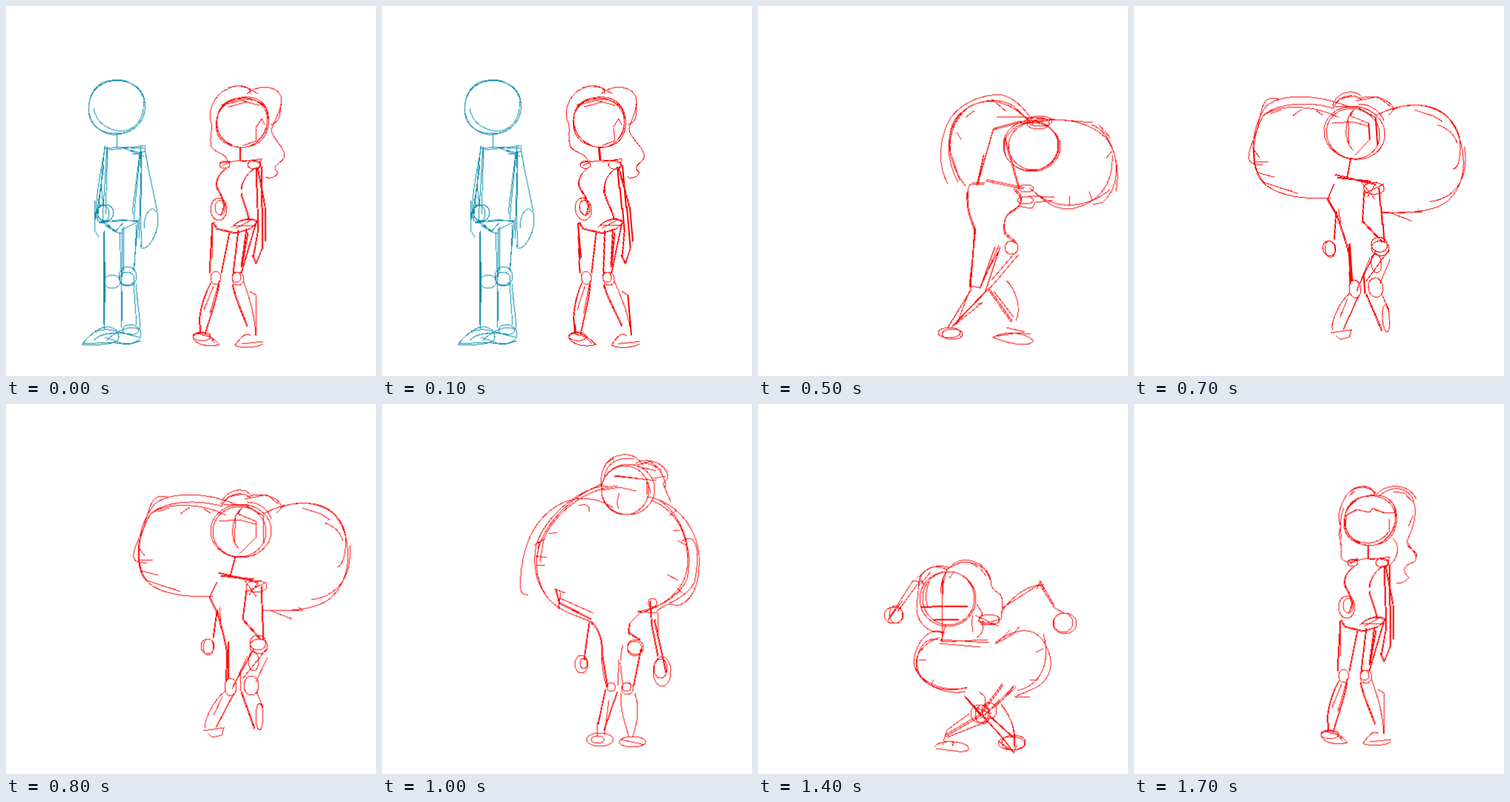
Animation, 500 px wide and 500 px high, one loop 1.8 s. Source, as an HTML page without scripts:

```html
<!DOCTYPE html>
<html lang="en">
<head>
<meta charset="utf-8">
<title>Rough sketch loop</title>
<style>
  html, body { margin: 0; width: 100%; height: 100%; overflow: hidden; background: #fff; }
  svg { display: block; width: 100%; height: 100%; overflow: hidden; }
  svg * { fill: none; vector-effect: non-scaling-stroke; }
  .strip { stroke: #f00; stroke-width: 1; shape-rendering: crispEdges; animation: flip 1.8s steps(18) -4ms infinite; }
  .him { stroke: #0088a8; }
  /* poses lean and stretch from the feet */
  .strip use { transform-origin: 320px 450px; }
  @keyframes flip { to { transform: translateX(-9000px); } }
</style>
</head>
<body>
<svg viewBox="-.5 -.5 500 500">
<defs>
  <g id="man">
    <path d="M149 100C120 98 109 122 112 145C116 165 135 175 150 173C175 171 190 152 187 130C184 110 165 99 149 99M128 106C112 115 106 140 116 157C128 175 160 176 175 163C192 148 191 118 175 108C160 97 135 99 126 108M118 138C122 160 140 168 158 169C178 165 187 148 185 128M140 101C160 96 178 106 186 124"/>
    <path d="M149 172V190M150 174L149 191M136 192L150 190L186 192M138 194L165 191L188 188M160 192L186 203M166 194L182 198M170 200L188 196"/>
    <path d="M136 190L130 290M137 190L134 282M134 188C128 220 120 260 121 288M133 190L126 260L123 290M132 215L122 280M119 262V302L125 312M128 240L131 270"/>
    <path d="M181 196L172 288M180 200L170 280M181 189C184 230 180 300 183 324M183 196L179 315M187 190C192 230 205 270 205 290C204 310 192 328 183 327L181 322M186 300C186 276 198 268 202 278"/>
    <ellipse cx="134" cy="279" rx="11" ry="11"/><ellipse cx="130" cy="280" rx="9" ry="12"/>
    <path d="M128 291L178 289M125 293L155 288L178 291M129 290L147 305L158 292M133 296C145 302 150 308 156 306M178 291L156 302M135 293L150 306"/>
    <path d="M132 300L133 436M131 305V430M133 345V400M157 300L155 435M153 305L156 380M158 298V358M178 291L172 358M176 295L173 350M175 375C177 400 181 425 181 436M156 385V425M172 375L176 430"/>
    <ellipse cx="143" cy="372" rx="11" ry="9"/><ellipse cx="164" cy="365" rx="12" ry="13"/><ellipse cx="163" cy="368" rx="10" ry="9"/><ellipse cx="168" cy="437" rx="11" ry="7"/>
    <path d="M102 457C112 445 125 432 138 433C150 435 155 445 150 452C140 458 115 458 102 457M104 456L140 454L165 457L182 452M118 452C125 442 145 440 168 443M135 452C150 436 170 430 181 437C185 450 175 458 155 455L133 447M120 441C135 430 160 444 180 447"/>
  </g>

  <g id="girl">
    <path d="M317 124C295 124 283 140 284 160C286 180 303 191 320 191C340 188 354 172 353 150C350 132 335 122 315 124M300 130C280 142 279 170 292 182C310 195 338 193 349 175C360 155 355 130 335 124C318 120 300 125 290 138M286 145C282 165 286 180 305 187M350 135C358 155 350 175 335 186"/>
    <path d="M315 190V208M316 191V208M292 215C305 207 330 206 343 212M288 212L303 209M318 210L345 206L341 219"/>
    <ellipse cx="295" cy="214" rx="7" ry="5"/><ellipse cx="335" cy="214" rx="9" ry="6"/><ellipse cx="287" cy="274" rx="11" ry="15"/><ellipse cx="289" cy="272" rx="7" ry="10"/>
    <path id="girl-limbs" d="M297 219C285 228 281 240 288 250C293 258 298 270 290 282M337 218C325 225 317 238 318 252C320 265 327 275 328 288M340 217L350 270L351 317M338 217L341 300L334 340M345 215L347 325L338 347L333 335M280 291L285 300L310 306L330 300L340 291C330 283 315 288 305 298M279 292L275 360M302 305L291 360M314 302L307 360M338 292L318 360M327 305L319 350M325 300L318 352M277 373C265 395 260 420 262 430L262 442M288 375C284 400 272 430 269 443M306 375C310 395 320 415 326 432"/>
    <use href="#girl-limbs" x="-1" y="1"/>
    <path d="M310 300L332 288M307 296L338 296M320 370C328 395 335 410 337 445M329 385L337 390V445M278 300V340M280 378L267 410M288 370L275 415"/>
    <ellipse cx="283" cy="367" rx="7" ry="9"/><ellipse cx="313" cy="368" rx="8" ry="9"/><ellipse cx="311" cy="366" rx="6" ry="7"/><ellipse cx="264" cy="446" rx="12" ry="6"/>
    <path d="M252 446C262 436 275 443 288 457C275 461 255 458 252 447M256 441L275 447L282 455M309 458C318 445 325 440 330 445M318 456L347 453M309 458C318 463 340 461 347 456"/>
  </g>
  <g id="curls">
    <path d="M297 113C310 104 330 106 330 118M300 110L312 107L326 110L340 118M325 118C340 106 365 106 371 122C374 140 360 155 358 168C362 182 376 190 376 203C372 212 358 216 365 222C372 228 352 236 351 230M297 112C282 120 272 140 276 155C281 165 273 175 277 190C284 200 297 197 299 210M372 130C368 142 374 155 357 160M290 134C310 122 340 122 350 137M293 133L318 127L342 134M300 136L325 129M337 164L345 152L349 160M338 165L337 182L320 188"/>
  </g>
  <g id="bunches">
    <path d="M325 122C320 106 298 108 287 122C276 140 274 155 279 165C272 178 284 190 279 205C284 218 300 214 301 207M292 119C300 110 315 110 327 120M283 140C274 160 282 175 278 190M327 122C340 106 370 106 381 128M330 124C345 112 362 108 375 125C384 145 378 165 368 185C376 200 386 205 378 213C364 218 360 224 371 234Q365 242 354 242M349 181C360 190 356 208 346 216M368 190L382 202L380 210M350 118L365 120L376 132M290 124L298 117M377 150L370 165M287 150L300 142L318 146L322 140L335 146L352 147M289 148L302 142M324 142L340 147M287 150C284 165 285 178 300 184C318 192 335 185 344 172V155"/>
  </g>

  <g id="folded">
    <g id="hip"><ellipse cx="196" cy="141" rx="18" ry="12" transform="rotate(20 196 141)"/></g>
    <use href="#hip" x="-1" y="-3"/><use href="#hip" x="2" y="3"/>
    <path d="M190 152L187 215L191 222L200 150M193 153L194 220M200 152L188 220M198 135L197 210M203 156C196 185 192 215 202 240C207 235 217 200 216 170L210 150M197 210L205 203L206 193M194 205L201 238"/>
    <path d="M180 128C200 150 240 145 270 152L300 165M227 149L226 160L258 150M230 152L300 170M210 168L260 160L330 165M240 157L310 180"/>
    <ellipse cx="258" cy="175" rx="25" ry="10"/><ellipse cx="262" cy="171" rx="20" ry="11"/><ellipse cx="256" cy="178" rx="21" ry="11"/>
    <path d="M242 182L235 250L236 261L233 258M246 184L240 248L245 255L262 185M270 172L248 250M265 178L243 243M258 165L246 252M241 170L237 245"/>
    <ellipse cx="314" cy="180" rx="18" ry="15"/><ellipse cx="312" cy="182" rx="14" ry="14"/>
    <path d="M275 141C300 138 330 150 334 185C334 205 305 203 297 195M260 150C290 140 325 155 330 180M285 143L315 165L330 162M325 165L324 205"/>
  </g>
  <g id="eating">
    <path d="M274 131C250 140 220 155 214 165M214 165L280 170M240 160L275 152L300 158M290 137C310 130 340 135 355 155M297 139C315 130 345 138 355 160L336 163M300 135L325 140L340 152M345 163C370 168 378 195 370 222C362 245 338 250 326 240M360 163C380 195 375 235 345 246L326 247M250 195C260 205 290 213 310 211C340 205 350 180 342 155M312 210C345 205 350 170 335 150M320 137L352 147M362 172L374 190V210M278 170L303 228M282 175L290 205L305 229M300 205L288 228"/>
    <ellipse cx="297" cy="158" rx="15" ry="10"/><ellipse cx="293" cy="160" rx="14" ry="8"/>
    <ellipse cx="309" cy="236" rx="15" ry="9"/><ellipse cx="306" cy="232" rx="14" ry="8"/>
    <path id="eat-limbs" d="M271 224L320 228M275 231L325 237M272 232L256 260L308 268M282 235L266 262M318 245L308 268M280 262L306 266M277 268L280 297M308 268C303 285 315 295 328 308M283 300L279 380M310 325L300 385M307 318L293 380M330 322L313 365M338 318L316 375M298 386L262 440M315 372L330 425M319 372C328 390 335 410 336 432"/>
    <use href="#eat-limbs" x="1" y="1"/>
    <path d="M278 268V296M290 315V382M287 290L279 350M320 240V225L290 226M281 387C270 400 262 415 260 432M285 388L258 440M275 398L280 390"/>
    <ellipse cx="328" cy="312" rx="13" ry="13"/><ellipse cx="326" cy="314" rx="10" ry="10"/><path d="M316 293C335 292 347 303 344 316"/>
    <ellipse cx="287" cy="382" rx="6" ry="6"/><ellipse cx="314" cy="363" rx="5" ry="8"/>
    <path d="M252 437C265 425 285 425 291 435C285 443 265 447 257 445ZM313 435C325 428 350 433 357 442L316 441ZM320 437L340 443"/>
  </g>

  <g id="full">
    <path d="M256 240C245 220 240 185 260 150C280 125 310 118 330 120C350 125 365 145 372 158M280 243C262 220 252 190 262 160C275 130 320 118 345 135L372 160M270 238C250 200 255 165 275 143C300 122 335 122 365 155M261 205C255 180 262 155 285 135M262 203L272 235M268 170L274 180M280 150L292 141M315 125L335 142M322 150L350 149L452 157M372 158C400 150 440 150 470 178C490 205 488 245 465 265L452 268M478 200C480 235 465 262 430 272C405 280 385 262 366 245M450 160C480 170 490 220 483 250M372 250C400 275 440 275 475 248M460 160L476 178M470 205L478 195M365 256L400 258M420 270V256M447 250L451 262"/>
    <ellipse cx="368" cy="188" rx="37" ry="34"/><ellipse cx="370" cy="190" rx="38" ry="33"/><ellipse cx="372" cy="189" rx="34" ry="32"/>
    <ellipse cx="378" cy="158" rx="15" ry="8"/><ellipse cx="380" cy="155" rx="17" ry="7"/>
    <path id="full-limbs" d="M318 165L297 238M305 200L296 240M333 175L353 245M318 165L350 156L395 152M290 238L306 238M308 234L360 245M283 250C282 275 287 285 293 300L287 380M345 245C362 258 358 268 340 278C330 285 332 305 335 307L348 318M320 325L300 380M327 325L307 385M288 382L257 432M310 382L262 432M311 380L343 425"/>
    <use href="#full-limbs" x="-1" y="2"/>
    <path d="M350 270L370 273L374 265L398 262M284 260C280 240 290 236 297 240M294 300L285 378L300 380L325 323M352 335L312 382M345 335L315 370M303 370L325 330M285 385L268 430M263 432L303 400L296 403M335 370C350 385 355 410 348 425M318 385L345 420"/>
    <ellipse cx="342" cy="326" rx="9" ry="9"/><ellipse cx="362" cy="246" rx="10" ry="5"/><ellipse cx="361" cy="262" rx="11" ry="5"/>
    <ellipse cx="258" cy="441" rx="15" ry="7"/><ellipse cx="262" cy="443" rx="14" ry="7"/>
    <path d="M317 447C335 438 360 440 372 452C365 462 335 455 317 447M320 446L350 441L368 443M335 434L360 440"/>
  </g>

  <g id="sway">
    <path d="M310 135C270 118 220 118 200 135C180 160 172 200 183 230C195 252 230 262 279 259M220 126C190 115 195 150 180 180C165 210 172 215 190 214M292 138C260 128 215 130 195 148C178 175 172 215 190 238L235 253M195 148C220 130 270 135 297 150M180 195L187 205M178 210H198M183 225L205 231M210 245L228 250M205 145L220 140M235 148L248 139M267 141L276 147M347 148C380 130 430 125 448 155C465 180 470 230 440 260C420 280 370 280 347 278M370 140C400 125 450 135 458 175C460 200 455 218 447 220M464 190C468 235 445 260 412 264M347 279L400 278L395 274M355 278L386 290M365 147L372 140M400 140L425 148L437 156M430 160C445 165 452 175 455 185"/>
    <ellipse cx="317" cy="171" rx="41" ry="36"/><ellipse cx="315" cy="172" rx="36" ry="34"/>
    <path d="M290 135C295 116 320 110 330 122M291 137C300 118 320 118 330 126M325 125C345 118 370 125 372 140M322 128L352 122L368 135M300 125L320 121M320 138C305 150 300 180 314 195M322 136L347 150V188M318 140L313 148L337 158V180L315 202M287 158L315 156L337 162M310 150L308 187M293 135L325 137L348 151M325 132C345 132 355 145 358 155"/>
    <path id="sway-limbs" d="M310 205L303 232M287 227L340 240M290 231L335 236M285 240L275 260L285 280L280 315M285 277C290 300 298 320 299 340L297 375M325 250L320 290L345 318M345 245L348 318M300 320V370M335 330L307 380M352 330L320 370M308 390L284 436M318 388L336 438"/>
    <use href="#sway-limbs" x="-1" y="1"/>
    <path d="M288 274L290 295M322 238L338 260M343 237L328 258M325 253L352 240M295 388C280 400 268 425 268 437M292 395L280 420M326 340L305 385M353 342L337 375M316 360V388M338 388L347 410"/>
    <ellipse cx="338" cy="246" rx="14" ry="8"/><ellipse cx="272" cy="327" rx="9" ry="10"/><ellipse cx="273" cy="328" rx="7" ry="11"/>
    <ellipse cx="340" cy="322" rx="11" ry="10"/><ellipse cx="341" cy="327" rx="12" ry="10"/><ellipse cx="334" cy="347" rx="7" ry="13"/><ellipse cx="303" cy="382" rx="8" ry="12"/><ellipse cx="331" cy="380" rx="10" ry="13"/><ellipse cx="342" cy="422" rx="5" ry="18"/>
    <path d="M266 441L294 437L291 447L278 450L273 445"/>
  </g>

  <g id="puff">
    <path d="M312 140C300 130 260 115 225 145C195 170 185 215 187 250Q188 258 197 257M305 110C270 110 220 150 208 190C200 230 215 270 260 285L285 295M298 107C265 120 215 155 208 210C208 240 220 265 240 275M318 110C270 115 230 150 217 185M205 190L220 182M207 205L222 207M208 218L220 217M212 185L208 215M218 183L213 213M225 175L236 173M265 137Q280 132 280 145M357 125C395 130 425 165 428 205C430 240 420 265 400 272L388 270M365 130C400 145 415 180 412 220C408 255 375 275 348 282M375 130C405 150 420 195 412 235C402 260 375 275 345 280M405 185C425 170 430 200 422 240C412 262 380 270 370 280M388 150L398 143M393 170H402M399 184L410 190M385 230L400 238M398 248L406 255"/>
    <ellipse cx="332" cy="115" rx="36" ry="34"/><ellipse cx="328" cy="116" rx="32" ry="33"/>
    <path d="M295 110C295 85 305 70 325 68C340 66 350 78 352 82M300 98C303 80 318 70 340 74M342 80C360 70 385 80 386 100L379 107L390 132M344 82C360 75 380 84 383 112M305 78L313 73M345 84L370 90M350 80L362 77L378 90M366 100L383 97M313 97L370 103M314 96L360 102M297 116L320 112L343 117M320 120C317 130 317 138 320 141M357 100V122M359 106L363 120"/>
    <path id="puff-limbs" d="M235 250L240 268L283 290M280 293C295 300 298 320 298 340L305 382M348 282L335 295L333 308L349 318M280 295L273 345M362 265L365 300L373 340M368 290L384 362M350 330L340 380M318 388L300 440M302 385L292 432"/>
    <use href="#puff-limbs" x="-1" y="1"/>
    <path d="M241 254L238 277M240 262L285 282M232 249L247 255M345 280L372 282V310M297 325C294 350 300 370 303 382M320 345L318 380M325 325C320 345 322 360 325 378M306 400L300 447M323 390C320 410 328 430 333 450M341 390C348 410 345 430 338 450M290 430V448"/>
    <ellipse cx="269" cy="351" rx="9" ry="12"/><ellipse cx="272" cy="350" rx="5" ry="7"/><ellipse cx="365" cy="268" rx="6" ry="6"/><ellipse cx="378" cy="361" rx="12" ry="20"/><ellipse cx="376" cy="357" rx="9" ry="13"/>
    <ellipse cx="342" cy="328" rx="11" ry="10"/><ellipse cx="341" cy="330" rx="10" ry="10"/><ellipse cx="309" cy="382" rx="6" ry="6"/><ellipse cx="331" cy="384" rx="8" ry="8"/><ellipse cx="330" cy="382" rx="6" ry="6"/>
    <ellipse cx="294" cy="453" rx="18" ry="9"/><ellipse cx="291" cy="453" rx="9" ry="5"/><ellipse cx="338" cy="456" rx="18" ry="7"/><path d="M322 453L355 460"/>
  </g>

  <g id="squat">
    <ellipse cx="256" cy="263" rx="38" ry="37"/><ellipse cx="257" cy="262" rx="35" ry="36"/>
    <path d="M218 245C215 225 235 215 257 220M217 240C220 222 240 214 255 224M247 255C245 230 260 212 280 210C300 212 315 225 315 245C320 258 330 250 330 270L328 290M248 250L255 222L275 213C300 213 310 225 313 237M215 235L223 228M219 243L233 226M225 245L218 236M265 225L258 235M285 213L296 220M300 222L308 232M217 240L214 275C213 290 225 305 240 308M231 240C225 255 225 265 230 275M295 270L303 283L297 293M290 285C285 300 293 305 289 308M303 292C305 305 303 310 295 315M248 240V320M250 235L248 280"/>
    <path id="mouth" d="M220 274L250 272L283 273M238 290H271"/><use href="#mouth" y="1"/>
    <path d="M253 298L247 320M217 240L209 238L176 290M195 265L175 292M215 243L188 280M300 298L328 290L330 275L380 243L400 275L415 283M330 278C345 258 365 243 386 244M380 238L400 272M376 250L381 239L386 250M293 285L325 300M298 293L320 298"/>
    <ellipse cx="183" cy="285" rx="13" ry="11"/><ellipse cx="186" cy="284" rx="9" ry="12"/><ellipse cx="414" cy="296" rx="16" ry="14"/><ellipse cx="412" cy="295" rx="13" ry="13"/><ellipse cx="312" cy="291" rx="14" ry="7"/>
    <path d="M245 318L312 322M245 323L300 328M247 321L310 318M250 308C225 300 210 330 210 350C215 375 250 390 282 383M243 318C220 312 208 345 218 365C230 385 260 392 280 388M245 315C215 325 205 350 220 370C235 385 260 390 282 382M235 306L252 309M216 335L223 330M217 345H227M233 380L237 372M320 322C350 300 375 300 388 325C402 350 395 375 370 385L347 395M320 324L345 310L353 300M325 320L340 305M385 310C395 345 385 378 350 387M375 335L385 330M367 372H378M347 395H367M345 380L330 400"/>
    <path id="squat-legs" d="M278 393L300 420M347 380L315 410M330 377L298 420L252 447M280 395L330 450L345 470M312 420L345 450M328 405C340 420 348 440 345 462"/>
    <use href="#squat-legs" x="1" y="2"/>
    <path d="M298 388L306 395V410M310 428L255 450M250 455L255 440L285 418M295 410L315 418M300 425L318 408"/>
    <ellipse cx="299" cy="418" rx="12" ry="12"/><ellipse cx="312" cy="414" rx="10" ry="11"/><ellipse cx="303" cy="419" rx="10" ry="13"/>
    <path d="M238 463C245 452 275 455 283 462Q288 470 270 469L240 465M249 460Q250 452 264 457L262 462"/>
    <ellipse cx="342" cy="458" rx="18" ry="9"/><ellipse cx="345" cy="457" rx="16" ry="10"/><path d="M325 455L345 470L350 460"/>
  </g>
</defs>

<g class="strip">
  <g><use href="#man" class="him"/><use href="#girl"/><use href="#curls"/></g>
  <g transform="translate(500)"><use href="#man" class="him"/><g style="transform-origin:320px 450px;transform:skewX(5deg)"><use href="#girl"/><use href="#curls"/></g></g>
  <g transform="translate(1000)"><g class="him" transform="translate(40 -80) rotate(15 150 280)"><use href="#man"/></g><use href="#eating" style="transform:skewX(2deg)"/></g>
  <g transform="translate(1500)"><use href="#folded" class="him"/><use href="#eating"/></g>
  <g transform="translate(2000)"><g class="him" transform="translate(72 36) scale(.8)"><use href="#folded"/></g><use href="#eating" style="transform:skewX(-4deg)"/></g>
  <g transform="translate(2500)"><use href="#full"/></g>
  <g transform="translate(3000)"><use href="#full" style="transform:skewX(3deg)"/></g>
  <g transform="translate(3500)"><use href="#sway" style="transform:skewX(4deg)"/></g>
  <g transform="translate(4000)"><use href="#sway"/></g>
  <g transform="translate(4500)"><use href="#sway" style="transform:scale(.96,1.08)"/></g>
  <g transform="translate(5000)"><use href="#puff"/></g>
  <g transform="translate(5500)"><use href="#puff" style="transform:scaleY(1.015)"/></g>
  <g transform="translate(6000)"><use href="#puff" style="transform:scale(1.1,.85)"/></g>
  <g transform="translate(6500)"><use href="#squat" style="transform:scale(1.06,.93)"/></g>
  <g transform="translate(7000)"><use href="#squat"/></g>
  <g transform="translate(7500)"><use href="#squat" style="transform:scale(.85,1.15)"/></g>
  <g transform="translate(8000)"><g style="transform-origin:320px 450px;transform:scale(1.04,.97)"><use href="#girl"/><use href="#bunches"/></g></g>
  <g transform="translate(8500)"><use href="#girl"/><use href="#bunches"/></g>
</g>
</svg>
</body>
</html>
```
